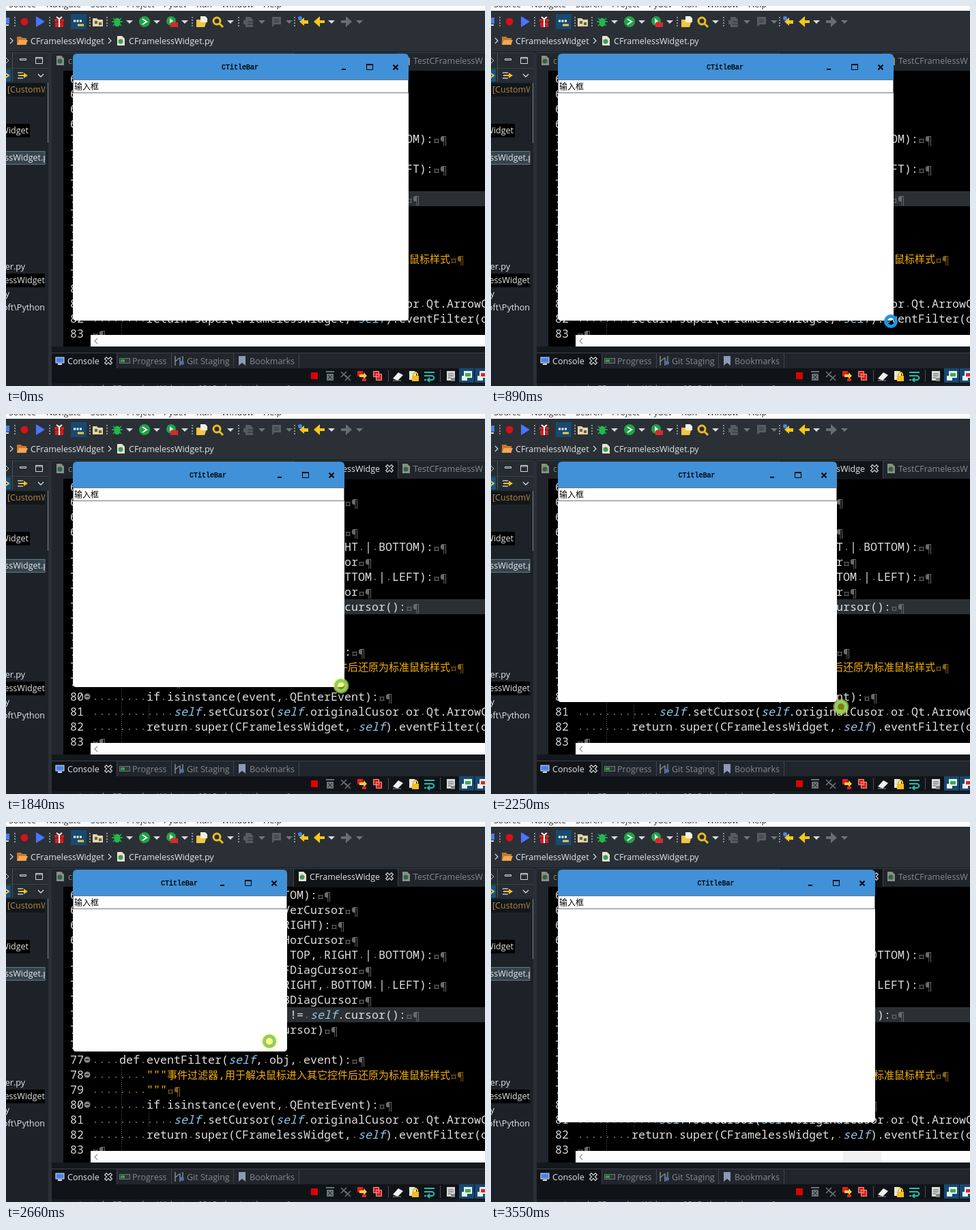
An HTML page that plays this animation: 702 px wide and 558 px high, repeating every 4.08 s.

```html
<!DOCTYPE html>
<html lang="en">
<head>
<meta charset="utf-8">
<title>Frameless window resize</title>
<style>
  html, body { margin: 0; width: 100%; height: 100%; overflow: hidden; background: #000; }
  svg { display: block; width: 702px; height: 558px; }
  text { white-space: pre; }
  .ui { font: 12.5px "Open Sans", "Noto Sans", sans-serif; fill: #e4e6e8; }
  .dim { fill: #858a8e; }
  .code { font: 16.667px "Noto Sans Mono", "DejaVu Sans Mono", monospace; fill: #dedede; }
  .cjk { font-family: "Noto Sans CJK SC", "Noto Sans CJK", sans-serif; }
  .title { font: 10px "Liberation Mono", monospace; text-anchor: middle; stroke: #000; stroke-width: .35px; }
</style>
</head>
<body>
<svg viewBox="0 0 702 558">
  <defs>
    <clipPath id="tree"><rect y="68" width="57" height="490"/></clipPath>
    <path id="drop" d="M-5-2h10l-5 5z"/>
    <path id="grip" d="M0-7v14" stroke="#8b9297" stroke-width="2" stroke-dasharray="2 2"/>
    <g id="file"><path d="M-5-7h7l4 4V7H-5z" fill="#e9e4cf"/><circle cy="1" r="3.5" fill="#3c9a5c"/></g>
    <path id="cross" d="M-4-4L4 4M4-4L-4 4" fill="none" stroke-width="1.6"/>
    <g id="close" fill="none" stroke-linecap="square">
      <path d="M-3-3L3 3M3-3L-3 3" stroke="#d0d3d5" stroke-width="4.6"/>
      <path d="M-3-3L3 3M3-3L-3 3" stroke="#101418" stroke-width="2.2"/>
    </g>
    <g id="fold"><circle r="4.5" fill="#85898c"/><path d="M-2.5 0h5" stroke="#111" stroke-width="1.5"/></g>
  </defs>

  <rect width="702" height="558" fill="#14191e"/>
  <rect y="7" width="702" height="60" fill="#2a3036"/>
  <rect width="702" height="7" fill="#fcfcfc"/>
  <g id="menu" class="ui" style="fill:#333"></g>

  <!-- toolbar -->
  <g transform="translate(0 23)">
    <path d="M0-6h5V3H0z" fill="#4a7fe8"/><path d="M0 4h4v2H0z" fill="#ddd"/>
    <circle cx="27" r="5.5" fill="#d4121a"/>
    <path d="M44-8L57 0 44 8z" fill="#4b74ff"/>
    <path d="M71-4h14v4H71zM72 1h12v7H72z" fill="#d8201f"/>
    <path d="M78-4V8M78-4l-4-3M78-4l4-3" stroke="#fff" stroke-width="2"/>
    <rect x="95" y="-11" width="23" height="22" fill="#174a72"/>
    <path d="M99-1h12" stroke="#fff" stroke-width="3" stroke-dasharray="3 1.500"/>
    <path d="M105 5h9" stroke="#ffc83d" stroke-width="3"/>
    <path d="M127-5h6l2 2h7V7h-15z" fill="#e9d59b"/><path d="M130-1h4v4h-4zM136 1h4v4h-4z" fill="#55636d"/>
    <path d="M157-5l12 11M169-5L157 6M155 0h16" stroke="#1ca344" stroke-width="2"/>
    <ellipse cx="163" cy="1" rx="4.5" ry="6.5" fill="#23b74e"/>
    <circle cx="203" r="8" fill="#1fa347"/><path d="M200-4l6 4-6 4" stroke="#fff" stroke-width="2" fill="none"/>
    <circle cx="242" cy="-1" r="7" fill="#1fa347"/><path d="M240-5l5 4-5 4z" fill="#fff"/>
    <path d="M241 1h11v7H241z" fill="#d92a2a"/>
    <path d="M279-3h6l2 2h7l-3 9h-12z" fill="#f5c542"/><path d="M285-8h7l3 3v6h-10z" fill="#f4f1e5"/>
    <circle cx="309" cy="-1" r="5" fill="none" stroke="#f0bc20" stroke-width="3"/><path d="M313 3l5 5" stroke="#f0bc20" stroke-width="3"/>
    <path d="M351-7h7l4 4V8h-11zM348-2h6v6h-6z" fill="#555d63"/><path d="M354 0h8M354 4h8" stroke="#2a3036"/>
    <path d="M390-7h13V4h-9l-4 4z" fill="#555d63"/><path d="M393-3h7M393 0h7" stroke="#2a3036"/>
    <path d="M443-2h-6v-4l-7 6 7 6V3h6z" fill="#f6c81c"/><circle cx="431" cy="-5" r="3" fill="#4a82f0"/>
    <path d="M467-2h-7v-6l-9 8 9 8V2h7z" fill="#f6c81c"/>
    <path d="M491-2h7v-6l9 8-9 8V2h-7z" fill="#666e74"/>
    <g id="drops"></g>
  </g>

  <!-- breadcrumb -->
  <path d="M6 47l4 4-4 4M150 47l4 4-4 4" fill="none" stroke="#c8ccd0" stroke-width="1.4"/>
  <path d="M16 45h6l2 2h6v10H16z" fill="#c9782b"/><path d="M19 50h13l-3 7H16z" fill="#f2a653"/>
  <use href="#file" x="168" y="51"/>
  <text class="ui" x="36" y="56">CFramelessWidget</text>
  <text class="ui" x="180" y="56">CFramelessWidget.py</text>

  <!-- project tree -->
  <rect y="68" width="62" height="490" fill="#1c2228"/>
  <rect y="68" width="62" height="45" fill="#252c32"/>
  <rect x="62" y="68" width="5" height="490" fill="#2a3036"/>
  <path d="M0 68.5h62M0 91.5h62" stroke="#3a4248"/>
  <g stroke="#d5d8da" fill="none">
    <path d="M0 76l4 4-4 4"/><path d="M20.500 77.500h9v2h-9zM43.500 75.500h10v9h-10zM43 77h11"/>
    <path d="M47 100l4 4 4-4" stroke-width="1.4"/>
  </g>
  <rect y="93" width="7" height="18" fill="#17547f"/><path d="M0 99l4 3-4 3" stroke="#f5c542" stroke-width="2" fill="none"/>
  <path d="M9.500 69v42" stroke="#4a5258"/>
  <path d="M17 98h8M17 106h8" stroke="#c8c8c8" stroke-width="1.500"/><path d="M18 101h8v-3l6 4-6 4v-3h-8z" fill="#f4bc28"/>
  <rect y="113" width="57" height="20" fill="#11161a"/><rect y="173" width="35" height="20"/><rect y="393" width="57" height="20"/>
  <rect x="-1" y="213.500" width="58" height="19" fill="#36444e" stroke="#657782"/>
  <rect x="61" y="113" width="1" height="88" fill="#7d8489"/>
  <g id="files" class="ui" clip-path="url(#tree)"></g>

  <!-- editor -->
  <rect x="67" y="68" width="635" height="432" fill="#20262c"/>
  <path d="M67 68.500h635" stroke="#3a4248"/>
  <rect x="84" y="95" width="618" height="405"/>
  <rect x="421" y="69" width="153" height="27" fill="#101418"/>
  <path d="M421.500 69v26M574.500 69v26" stroke="#3b4349"/>
  <use href="#file" x="79" y="80" opacity=".55"/><use href="#file" x="434" y="80"/><use href="#file" x="586" y="80" opacity=".55"/>
  <text class="ui dim" x="91" y="85">c</text>
  <text class="ui" x="445" y="85">CFramelessWidge</text>
  <text class="ui dim" x="597" y="85">TestCFramelessW</text>
  <use href="#close" x="562" y="80"/>
  <rect x="124" y="272" width="578" height="22" fill="#2a2f33"/>
  <path d="M169.500 358v124M209.500 428v20" stroke="#62666a" stroke-dasharray="1 2"/>
  <g id="code" class="code"></g>
  <use href="#fold" x="119" y="349"/><use href="#fold" x="119" y="371"/><use href="#fold" x="119" y="415"/>
  <rect x="124" y="483" width="578" height="17" fill="#fdfdfd"/>
  <rect id="thumb" x="516" y="484" width="56" height="16" fill="#f1f1f1"/>
  <path d="M134 488l-4 4 4 4" fill="none" stroke="#a0a0a0" stroke-width="1.500"/>

  <!-- console -->
  <rect x="67" y="509" width="635" height="49" fill="#20262c"/>
  <path d="M67 509.500h635" stroke="#3a4248"/>
  <rect x="67" y="510" width="95" height="23" fill="#101418"/>
  <rect x="67" y="532" width="635" height="22" fill="#101418"/>
  <rect x="67" y="554" width="635" height="4" fill="#171c21"/>
  <path d="M162.500 510v22M242.500 510v22M333.500 510v22M429.500 510v22" stroke="#3d454b"/>
  <rect x="73" y="516" width="12" height="8" fill="#4a82e8" stroke="#dce4f2"/><path d="M76 526h6" stroke="#ddd" stroke-width="2"/>
  <use href="#close" x="150" y="521"/>
  <rect x="166.500" y="517.500" width="15" height="7" fill="#31383c" stroke="#71797d"/><rect x="168" y="519" width="6" height="4" fill="#2da04c"/>
  <path d="M248 514v14M248 522l6-5M255 516v12M259 514v8" stroke="#808b95" stroke-width="1.500"/><circle cx="258" cy="524" r="3" fill="#4d6fa5"/>
  <path d="M341 514h10v14l-5-4-5 4z" fill="#8d99b5"/>
  <g class="ui"><text x="90" y="526">Console</text><g class="dim"><text x="185" y="526">Progress</text><text x="265" y="526">Git Staging</text><text x="357" y="526">Bookmarks</text></g></g>
  <text class="ui dim" x="72" y="566">&lt;terminated&gt; CFramelessWidget.py [C:\Python\python.exe]</text>
  <g transform="translate(0 543)">
    <rect x="447" y="-5" width="10" height="10" fill="#e00000"/>
    <path d="M470-3h10v10h-10zM469-7h12v2h-12z" fill="#6c7276"/><path d="M472-1l6 6M478-1l-6 6" stroke="#24282c"/>
    <g stroke="#6c7276"><use href="#cross" x="495" y="-2"/><use href="#cross" x="501" y="3"/></g>
    <path d="M515-7h8v8h-8z" fill="#e22020"/><path d="M518-2h6v-3l5 5-5 5V2h-6z" fill="#f6cd3e"/><path d="M522 4h6v4h-6z" fill="#d82626"/>
    <path d="M538.500-6.500h8v8h-8zM542.500-2.500h8v9h-8z" fill="#df2020" stroke="#f39a91"/>
    <path d="M560.500-9V9M636.500-9V9" stroke="#485057"/>
    <path d="M567 4l8-9 7 4-8 8z" fill="#f2f2f2"/><path d="M567 7h12" stroke="#999"/>
    <path d="M591-7h8l2 3V6h-10z" fill="#e9e5d9"/><path d="M595 0h10v8h-10z" fill="#f6be1e"/><path d="M597 0v-3q3-4 6 0v3" stroke="#f6be1e" fill="none" stroke-width="2"/>
    <path d="M613-5h15M613 0h12q5 3 0 6h-6M613 6h3M621 3l-3 3 3 3" stroke="#25bdb1" stroke-width="2" fill="none"/>
    <path d="M646-7h12V7h-12z" fill="#dadada"/><path d="M648-3h8M648 0h8M648 3h4" stroke="#555"/><path d="M652 3h6v5h-6z" fill="#888"/>
    <rect x="664" y="-11" width="22" height="21" fill="#174a72"/><rect x="687" y="-11" width="15" height="21" fill="#174a72"/>
    <g id="screen"><path d="M671-7h12V3h-12zM668 0h8v7h-8z" fill="#f0f0f0"/><path d="M673-4h8v5h-8z" fill="#2fb058"/></g>
    <path d="M694-7h8V3h-8zM691 0h8v7h-8z" fill="#f0f0f0"/><path d="M696-4h6v5h-6z" fill="#d92929"/>
  </g>

  <!-- frameless window -->
  <path id="body" fill="#fff"/>
  <path id="bar" fill="#4191d8"/>
  <rect id="input" x="98.500" y="108.500" height="19" fill="#fff" stroke="#777"/>
  <text class="cjk" x="100" y="123" font-size="12">输入框</text>
  <text id="title" class="title" y="93">CTitleBar</text>
  <g id="buttons" fill="none" stroke="#000">
    <path d="M-98 93h6" stroke-width="2"/>
    <path d="M-61.500 86v7.500h9V86" stroke-width="1"/><path d="M-62 86h10" stroke-width="2"/>
    <path d="M-22.500 86.500l7 7M-15.500 86.500l-7 7" stroke-width="2"/>
  </g>
  <g id="cursor">
    <circle r="7.500" fill="none" stroke="#1e97e3" stroke-width="5"/>
    <circle id="press" r="11.500" fill="#ff0" opacity=".5"/>
  </g>
</svg>
<script>
const NS = 'http://www.w3.org/2000/svg';
const $ = id => document.getElementById(id);
function add(parent, tag, attrs, text = '') {
  const node = document.createElementNS(NS, tag);
  for (const key in attrs) node.setAttribute(key, attrs[key]);
  node.textContent = text;
  parent.append(node);
  return node;
}

[['Source', 4], ['Navigate', 59], ['Search', 124], ['Project', 177], ['Pydev', 231],
 ['Run', 279], ['Window', 316], ['Help', 377]]
  .forEach(([label, x]) => add($('menu'), 'text', { x, y: 2 }, label));

for (const x of [181, 221, 262, 329, 375, 415, 477, 518])
  add($('drops'), 'use', { href: '#drop', x, fill: [375, 415, 518].includes(x) ? '#70777c' : '#d5d8da' });
for (const x of [13, 64, 123, 148, 273, 341, 423]) add($('drops'), 'use', { href: '#grip', x });

add($('files'), 'text', { x: 2, y: 127, style: 'fill:#b58a45' }, '[CustomWidget]');
[['Widget', 33, 187], ['lessWidget.py', 68, 227], ['ler.py', 28, 387], ['lessWidget', 57, 407],
 ['y', 5, 427], ['soft\\Python', 57, 447]]
  .forEach(([name, x, y]) => add($('files'), 'text', { x, y, 'text-anchor': 'end' }, name));

const LINES = `        if edge in (TOP, BOTTOM):
            cursor = Qt.SizeVerCursor
        elif edge in (LEFT, RIGHT):
            cursor = Qt.SizeHorCursor
        elif edge in (LEFT | TOP, RIGHT | BOTTOM):
            cursor = Qt.SizeFDiagCursor
        elif edge in (TOP | RIGHT, BOTTOM | LEFT):
            cursor = Qt.SizeBDiagCursor
        if cursor and cursor != self.cursor():
            self.setCursor(cursor)

    def eventFilter(self, obj, event):
        """
        """
        if isinstance(event, QEnterEvent):
            self.setCursor(self.originalCusor or Qt.ArrowCursor)
        return super(CFramelessWidget, self).eventFilter(obj, event)
`.split('\n');
const DOC = '#f4ae0c', FAINT = '#6a6a6a', DOC_FAINT = '#86600f';
const code = $('code');

LINES.forEach((line, row) => {
  const y = 113 + row * 22, doc = row === 12 || row === 13;
  const put = (text, x, fill, extra = '') =>
    add(code, 'text', { x, y, style: `fill:${fill};${extra}` }, text);
  const faint = doc ? DOC_FAINT : FAINT;
  put(String(66 + row), 94, '#d6d6d6');
  for (const { 0: part, index } of line.matchAll(/ +|\bself\b|[^ ]+?(?=\bself\b| |$)/g)) {
    const x = 126 + index * 10;
    if (part[0] === ' ') put('.'.repeat(part.length), x, faint).setAttribute('dy', -1);
    else if (part === 'self') put(part, x, '#91c8e8', 'font-style:italic');
    else put(part, x, doc ? DOC : '#dedede');
  }
  let end = 126 + line.length * 10;
  if (row === 12) {
    const cjk = 'font:15px "Noto Sans CJK SC","Noto Sans CJK",sans-serif';
    put('事件过滤器', 236, DOC, cjk);
    put(',', 311, DOC);
    put('用于解决鼠标进入其它控件后还原为标准鼠标样式', 321, DOC, cjk);
    end = 651;
  }
  put('¤¶', end, faint).setAttribute('dy', 3);
});

// time, pointer x, pointer y, window right, window bottom
const DRAG = [
  [1420, 589, 464, 590, 462], [1490, 577, 456, 582, 457], [1560, 556, 442, 563, 444],
  [1630, 535, 428, 541, 431], [1700, 517, 416, 522, 419], [1770, 503, 407, 508, 409],
  [1840, 491, 399, 496, 401], [1910, 468, 381, 478, 386], [1980, 442, 359, 452, 364],
  [2050, 430, 350, 433, 349], [2120, 451, 370, 444, 361], [2250, 513, 430, 507, 423],
  [2320, 549, 458, 551, 456], [2520, 528, 441, 540, 447], [2590, 460, 383, 485, 397],
  [2660, 386, 322, 412, 337], [2730, 346, 289, 360, 297], [2800, 362, 301, 358, 295],
  [2930, 474, 382, 449, 364], [3000, 550, 437, 528, 420], [3070, 562, 445, 552, 435],
  [3140, 561, 443, 563, 441]
];
const FINAL = [563, 441];
const STEPS = [[0, -40, -40, 590, 462]];
for (let i = 0; i < 8; i++) {
  const p = 1 - (1 - i / 7) ** 1.6;
  STEPS.push([70 + i * 70, 469 + 112 * p, 437 + 23 * p, 590, 462]);
}
STEPS.push([630, 584, 462, 590, 462], [890, 586, 463, 590, 462],
  [1020, 587, 463, 590, 462], [1220, 588, 464, 590, 462], ...DRAG,
  [3210, 560, 445, ...FINAL], [3280, 557, 459, ...FINAL], [3350, 551, 484, ...FINAL],
  [3420, 546, 517, ...FINAL], [3480, 544, 548, ...FINAL], [3550, -40, -40, ...FINAL]);

function draw(time) {
  const [, x, y, right, bottom] = STEPS.findLast(step => step[0] <= time);
  $('body').setAttribute('d', `M98 100H${right}V${bottom - 5}q0 5-5 5H103q-5 0-5-5z`);
  $('bar').setAttribute('d', `M98 108V76q0-6 6-6H${right - 6}q6 0 6 6V108z`);
  $('input').setAttribute('width', right - 99);
  $('title').setAttribute('x', (98 + right) / 2 - 1);
  $('buttons').setAttribute('transform', `translate(${right})`);
  $('cursor').setAttribute('transform', `translate(${x} ${y})`);
  $('press').style.display = time >= 1420 && time < 3210 ? '' : 'none';
  $('thumb').style.display = time >= 3350 ? '' : 'none';
}

const start = performance.now();
function tick() {
  draw((performance.now() - start) % 4080);
  requestAnimationFrame(tick);
}
tick();
</script>
</body>
</html>
```
